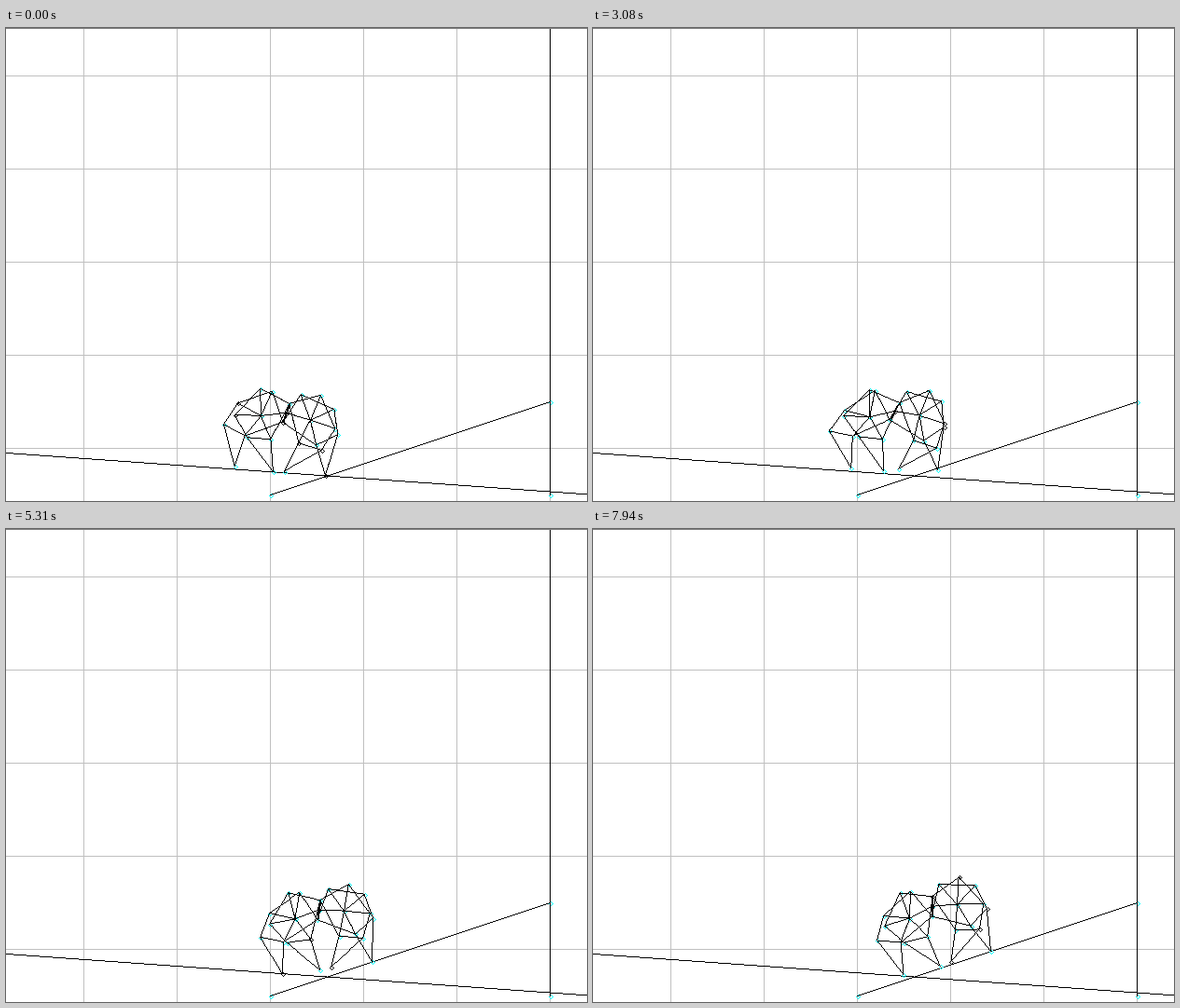
A matplotlib script for the animation above (8 s loop, 623x508 px).

```python
import numpy as np
import matplotlib.pyplot as plt
from matplotlib.animation import FuncAnimation

W, H, DPI = 623, 508, 100
FRAMES, LOOP = 135, 8000
BLACK, CYAN = (0, 0, 0), (0, 255, 255)

SCALE = 0.7      # pixels per unit of bar length
CRANK = 15
HUB = 38 + 7.8j  # hub as seen from the left pivot


def meet(p, q, rp, rq):
    """Joint at distances rp and rq from p and q, on the left of p -> q."""
    d = q - p
    dist = abs(d)
    along = (rp * rp - rq * rq + dist * dist) / (2 * dist)
    return p + d / dist * complex(along, max(rp * rp - along * along, 0) ** 0.5)


def leg(crank):
    """Joints of a left-hand leg for a crank pin, y up, hub at 0."""
    pivot = -HUB
    top = meet(pivot, crank, 41.5, 50)
    low = meet(crank, pivot, 61.9, 39.3)
    outer = meet(pivot, top, 40.1, 55.8)
    knee = meet(low, outer, 36.7, 39.4)
    foot = meet(low, knee, 49, 65.7)
    return np.array([crank, pivot, top, low, outer, knee, foot])


def pose(n):
    """Crank angle, hub position and body tilt (degrees) while climbing."""
    u = n / (FRAMES - 1)
    stall = np.sin(np.pi * (n - 2) / 75) ** 4
    angle = 71 - 527 * u + 15 * stall
    stride = (4.5 - 5.3 * u) * np.cos(2 * np.radians(angle))
    x = 303.4 + 58.8 * u + u * (1 - u) * (22 - 78 * u) + stride
    y = 412.8 - 3 * u - 5 * u * u
    tilt = -5 + 22 * u - 2.5 * stall
    return angle, complex(x, y), tilt


def walker(n):
    """Hub and the four legs (left, right, left, right) in screen pixels."""
    angle, hub, tilt = pose(n)
    turn = SCALE * np.exp(1j * np.radians(tilt))
    legs = []
    for half in (0, 180):
        pin = CRANK * np.exp(1j * np.radians(angle - tilt + half))
        for side in (leg(pin), -leg(-pin.conjugate()).conj()):
            legs.append(hub + (side * turn).conj())
    return hub, legs


def plot(img, xs, ys, color):
    xs, ys = np.rint(xs).astype(int), np.rint(ys).astype(int)
    ok = (xs >= 0) & (xs < W) & (ys >= 0) & (ys < H)
    img[ys[ok], xs[ok]] = color


def stroke(img, *points):
    for p, q in zip(points, points[1:]):
        d = q - p
        steps = int(np.ceil(max(abs(d.real), abs(d.imag)))) + 1
        z = np.linspace(p, q, steps)
        plot(img, z.real, z.imag, BLACK)


def node(img, p, color=CYAN):
    """Hollow diamond, one pixel right of and below the joint."""
    for r in (1j ** k for k in range(4)):
        ring = p + 1 + 1j + np.array([2 * r, r + r * 1j])
        plot(img, ring.real, ring.imag, color)


def backdrop():
    img = np.full((H, W, 3), 255, np.uint8)
    img[51::100] = 192
    img[:, 83::100] = 192
    base, peak, foot = 283 + 501j, 583 + 401j, 583 + 501j
    for p in (base, peak, foot):
        node(img, p)
    stroke(img, 456j, W + 500.4j)
    stroke(img, base, peak)
    stroke(img, 583, foot)
    img[0] = 128
    return img


BACK = backdrop()


def draw(n):
    img = BACK.copy()
    hub, legs = walker(n)
    rng = np.random.default_rng(n)
    for p in np.unique(np.round([hub, *np.ravel(legs)], 6)):
        node(img, p, BLACK if rng.random() < 0.2 else CYAN)
    for crank, pivot, top, low, outer, knee, foot in legs:
        stroke(img, crank, top, pivot, low, crank)
        stroke(img, top, outer, pivot, hub)
        stroke(img, outer, knee, low, foot, knee)
        stroke(img, hub, crank)
        stroke(img, hub + 1, crank + 1)
    return img


fig = plt.figure(figsize=(W / DPI, H / DPI), dpi=DPI, facecolor="white")
stage = fig.figimage(BACK, origin="upper")


def update(n):
    stage.set_data(draw(n))
    return [stage]


anim = FuncAnimation(fig, update, frames=FRAMES, init_func=lambda: update(0),
                     interval=LOOP / FRAMES, repeat=True, repeat_delay=0, blit=False)
plt.show()
```
